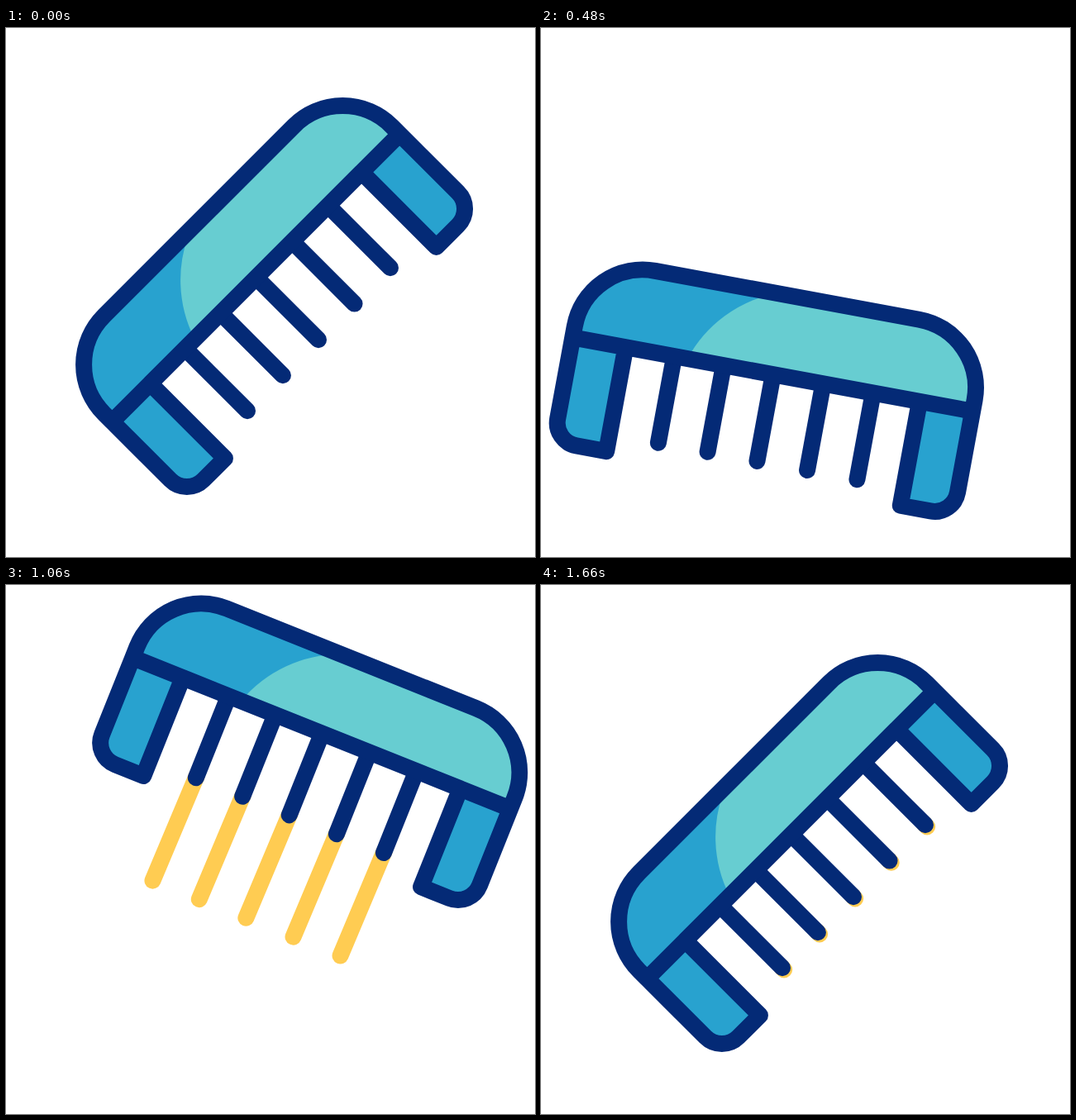
Recreate the animation shown at these times as an HTML page. Size 640 by 640 pixels, loop 2400 ms.

```html
<!DOCTYPE html>
<html lang="en">
<head>
<meta charset="utf-8">
<title>Comb</title>
<style>
  html, body { margin: 0; width: 100%; height: 100%; overflow: hidden; background: #fff; }
  svg { display: block; width: 100%; height: 100%; }
  path { fill: none; stroke-width: 20; stroke-linecap: round; stroke-linejoin: round; }
  .ink { stroke: #042a76; }
  #hair { stroke: #ffcc52; }
</style>
</head>
<body>
<svg viewBox="0 0 640 640">
  <!-- Origin: middle of the bar; teeth point down -->
  <g id="comb">
    <path id="hair"/>
    <path id="teeth" class="ink"/>
    <path style="fill:#28a2cf" d="M-246 0V-13.8A83.6 83.6 0 0 1 -162.4 -97.4H162.4A83.6 83.6 0 0 1 246 -13.8V99.8A28.2 28.2 0 0 1 217.8 128H180.8V0H-180.8V128H-217.8A28.2 28.2 0 0 1 -246 99.8Z"/>
    <path style="fill:#67cdd1" d="M-13.4 -97.4A157 157 0 0 0 -104.7 0H246V-13.8A83.6 83.6 0 0 0 162.4 -97.4Z"/>
    <path class="ink" d="M-246 0V-13.8A83.6 83.6 0 0 1 -162.4 -97.4H162.4A83.6 83.6 0 0 1 246 -13.8V99.8A28.2 28.2 0 0 1 217.8 128H180.8V0H-180.8V128H-217.8A28.2 28.2 0 0 1 -246 99.8ZM-246 0H246"/>
  </g>
</svg>
<script>
const LOOP = 2400, STEP = 20;
const DOWN_END = 568, UP_END = 1083, REST = 1620;
const LOW = 134, HIGH = -125.5, SLANT = 0.396;
const REST_ANGLE = -45, COMB_ANGLE = 21.8;
const TOOTH_END = 106.5;
const toothXs = [-121, -60.3, 0.6, 62.2, 123.6];

const comb = document.getElementById('comb');
const hair = document.getElementById('hair');
document.getElementById('teeth').setAttribute('d', toothXs.map(x => `M${x} 0V${TOOTH_END}`).join(''));

// Eased progress between two times, with given slopes at start and end
function ease(t, from, to, startSlope = 0, endSlope = 0) {
  const x = Math.min(1, Math.max(0, (t - from) / (to - from)));
  return x * x * (3 - 2 * x) + startSlope * x * (1 - x) ** 2 - endSlope * x * x * (1 - x);
}

// Vertical distance of the pivot from its resting place
function offset(t) {
  if (t < DOWN_END) return LOW * ease(t, 0, DOWN_END);
  if (t < UP_END) return LOW + (HIGH - LOW) * ease(t, DOWN_END, UP_END, 0.85, 0.78);
  return HIGH * (1 - ease(t, UP_END, REST, 0, 1.34));
}

function angle(t) {
  const turn = t < UP_END ? ease(t, 0, 552, 0, 1.25) : 1 - ease(t, UP_END, REST, 0, 0.61);
  return REST_ANGLE + (COMB_ANGLE - REST_ANGLE) * turn;
}

// Strands are pulled out by the upward stroke, then draw back into the teeth
function hairLength(t) {
  if (t < DOWN_END) return 0;
  const travel = (LOW - offset(Math.min(t, UP_END))) * Math.hypot(1, SLANT);
  return travel - 1 - 275 * ease(t, 830, 1300);
}

function draw(t) {
  const y = offset(t), length = hairLength(t);
  comb.setAttribute('transform',
    `translate(${324.2 - SLANT * y} ${324.2 + y}) rotate(${angle(t)}) translate(0 -31)`);
  hair.setAttribute('d', length > 0
    ? toothXs.map(x => `M${x} ${TOOTH_END - 2}L${x - 0.018 * length} ${TOOTH_END + length}`).join('')
    : '');
}

const start = performance.now();
function tick() {
  const t = (performance.now() - start) % LOOP;
  draw(Math.floor(t / STEP) * STEP);
  requestAnimationFrame(tick);
}
tick();
</script>
</body>
</html>
```
